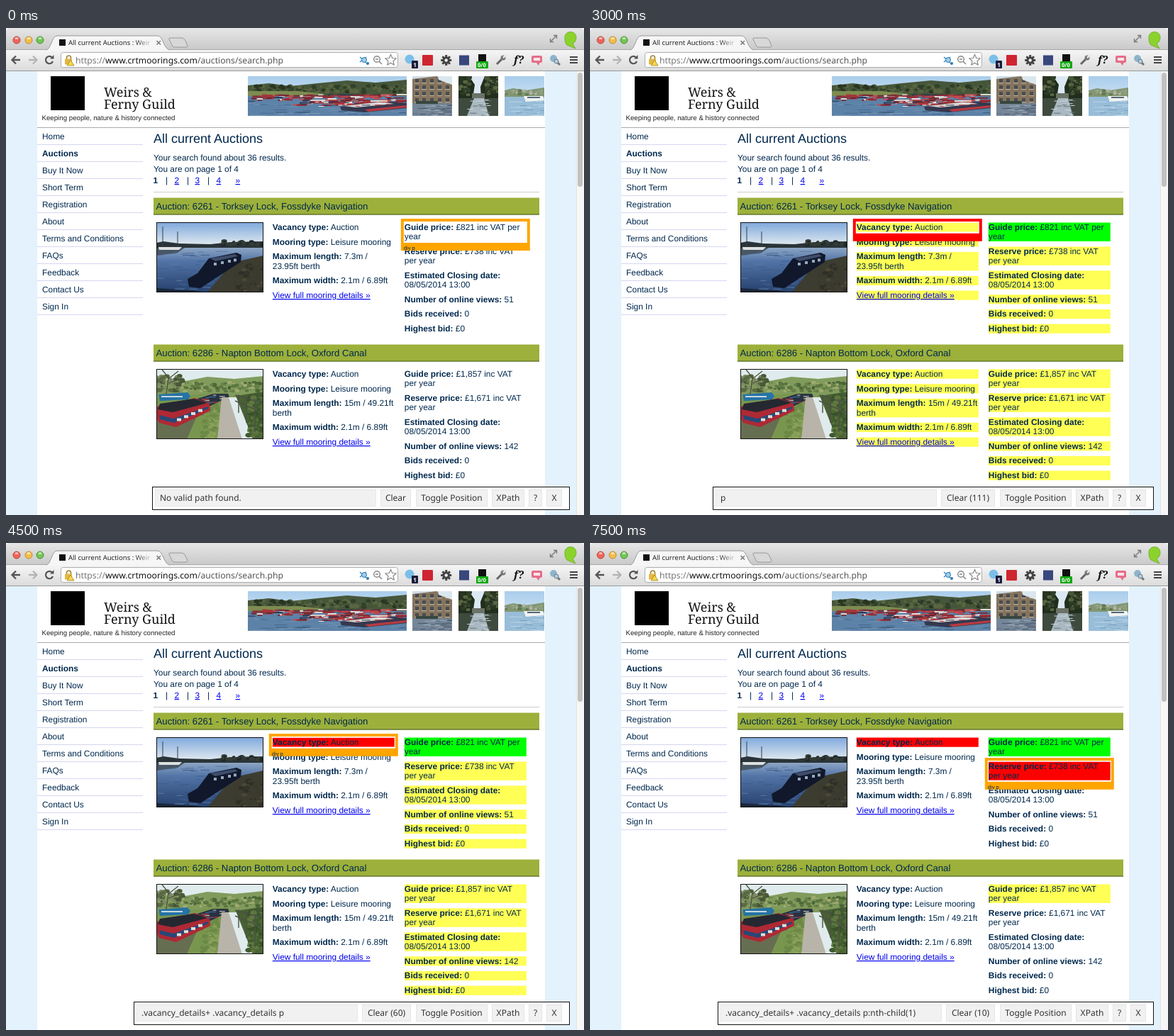
Animation of 815x687 px, one loop 9000 ms. Source, as an HTML page:

```html
<!DOCTYPE html>
<html lang="en">
<head>
<meta charset="utf-8">
<title>Auction selector</title>
<style>
  html, body { margin: 0; width: 100%; height: 100%; overflow: hidden; background: #fff; }
  #stage { display: block; }
  text { font-family: "Liberation Sans", Arial, sans-serif; fill: #00284d; text-rendering: geometricPrecision; white-space: pre; }
  .ui { font-family: "Noto Sans", "Open Sans", sans-serif; fill: #333; }
  .serif { font-family: "Noto Serif", serif; fill: #111; }
  .link { fill: #0000ee; text-decoration: underline; }
  .bold { font-weight: bold; }
</style>
</head>
<body>
<svg id="stage" width="815" height="687" viewBox="0 0 815 687" xmlns="http://www.w3.org/2000/svg"></svg>
<script>
const LOOP = 9000, STEP = 1500;
const YELLOW = '#ffff55', GREEN = '#00ff00', RED = '#ff0000', ORANGE = '#ffa500';

const rect = (x, y, w, h, fill, more = '') =>
  `<rect x="${x}" y="${y}" width="${w}" height="${h}" fill="${fill}" ${more}/>`;
const text = (x, y, content, size = 11.9, more = '') =>
  `<text x="${x}" y="${y}" font-size="${size}" ${more}>${content}</text>`;
const path = (d, fill, more = '') => `<path d="${d}" fill="${fill}" ${more}/>`;
const line = (d, colour, width = 1, more = '') =>
  path(d, 'none', `stroke="${colour}" stroke-width="${width}" ${more}`);
const circle = (x, y, r, fill, more = '') => `<circle cx="${x}" cy="${y}" r="${r}" fill="${fill}" ${more}/>`;
const fade = (id, stops, axis = 'x2="0" y2="1"') =>
  `<linearGradient id="${id}" ${axis}>${stops.map(([at, c, o = 1]) =>
    `<stop offset="${at}" stop-color="${c}" stop-opacity="${o}"/>`).join('')}</linearGradient>`;
const picture = (x, y, w, h, content) => `<svg x="${x}" y="${y}" width="${w}" height="${h}">${content}</svg>`;

function randomFrom(seed) {
  return () => (seed = (seed * 16807) % 2147483647) / 2147483647;
}

// Small shapes of random size and colour scattered over a box.
function scatter(seed, count, [x, y, w, h], colours, shape) {
  const rnd = randomFrom(seed * 7919);
  return Array.from({ length: count }, () =>
    shape((x + rnd() * w).toFixed(1), (y + rnd() * h).toFixed(1), 0.5 + rnd(),
      colours[Math.floor(rnd() * colours.length)])).join('');
}
const clumps = (seed, count, box, size, colours) => scatter(seed, count, box, colours, (x, y, k, fill) =>
  `<ellipse cx="${x}" cy="${y}" rx="${(size * k * 1.4).toFixed(1)}" ry="${(size * k).toFixed(1)}" fill="${fill}"/>`);
const streaks = (seed, count, box, length, colours, thick = 1) => scatter(seed, count, box, colours, (x, y, k, fill) =>
  rect(x, y, (length * k).toFixed(1), thick, fill));

const defs = `<defs>
  ${fade('strip', [[0, '#e6e6e6'], [1, '#c9c9c9']])}
  ${fade('bar', [[0, '#f6f6f6'], [1, '#dcdcdc']])}
  ${fade('title', [[0, '#222'], [.77, '#222'], [1, '#222', 0]], 'gradientUnits="userSpaceOnUse" x1="88" x2="209"')}
  ${fade('sky', [[0, '#7fa8dc'], [1, '#e3ebf0']])}
  ${fade('water', [[0, '#9db3cd'], [.35, '#5274a6'], [1, '#26406c']])}
  ${fade('pale', [[0, '#a9cdec'], [1, '#e6f0f6']])}
</defs>`;

function browser() {
  const light = (x, fill, edge) => circle(x, 17, 5, fill, `stroke="${edge}"`) +
    `<ellipse cx="${x}" cy="14.5" rx="2.6" ry="1.5" fill="#fff" opacity=".6"/>`;
  const gear = Array.from({ length: 8 }, (_, i) =>
    rect(619.2, 38, 3, 4, '#444', `transform="rotate(${i * 45} 620.7 45.5)"`)).join('');
  return path('M0 31V5Q0 0 5 0H810Q815 0 815 5V31Z', 'url(#strip)') +
    rect(0, 30, 815, 30, 'url(#bar)') + rect(0, 60, 815, 1, '#9a9a9a') +
    line('M0 30.5H57M232 30.5H815', '#a8a8a8') +
    light(15, '#f0655a', '#b8443c') + light(32, '#f5bd4c', '#bd8a2e') + light(48, '#72c655', '#4b9134') +
    path('M56 31C64 31 64 11 72 11H214C222 11 222 31 232 31', '#f6f6f6', 'stroke="#999"') +
    path('M232 14H248Q251 14 253 18L256 25Q256 27 253 27H238Q235 27 234 24L230 16Q229 14 232 14Z', '#d8d8d8', 'stroke="#999"') +
    rect(75, 16, 9, 9, '#111') +
    text(88, 24, 'All current Auctions : Weir', 9.5, 'class="ui" style="fill:url(#title)"') +
    line('M212.5 18L218 23.5M218 18L212.5 23.5', '#777', 1.5) +
    line('M767 20L777 10M772 10.5H776.5V15M767.5 15V19.5H772', '#777', 1.3) +
    path('M788 13C788 3 804 3 804 13C804 19 801 21 799 22L803 29L791 24C788 21 788 17 788 13Z', '#8bd32c', 'stroke="#62a51c" stroke-width=".7"') +
    line('M20 45H9M14 39.5L8.5 45L14 50.5', '#555', 2.3) +
    line('M32 45H43M38 39.5L43.5 45L38 50.5', '#b5b5b5', 2.3) +
    line('M65 41.5A5.2 5.2 0 1 0 66 47', '#555', 2.2) + path('M62 43.5H67.5V38Z', '#555') +
    rect(77.5, 34.5, 475, 21, '#fff', 'rx="3" stroke="#adadad"') +
    line('M85.5 44V42A3 3 0 0 1 91.5 42V44', '#a28633', 1.7) + rect(83, 43.5, 10, 8, '#e5b844', 'rx="1"') +
    path('M91 45L96 53H86Z', '#f7d845', 'stroke="#8d772b" stroke-width=".7"') +
    text(98, 50, '<tspan fill="#777">https://</tspan><tspan fill="#111">www.crtmoorings.com</tspan><tspan fill="#555">/auctions/search.php</tspan>', 12.2, 'class="ui"') +
    line('M499 41L508 49M499 48L508 41', '#3183bd', 1.4) + circle(505, 45, 3.5, '#9fd0ed', 'stroke="#2c78ad"') + circle(510, 50, 2, '#2c78ad') +
    circle(523, 44, 4.3, '#fff', 'stroke="#8a8a8a" stroke-width="1.5"') + line('M521 44H525M526 47L530 51', '#8a8a8a', 1.6) +
    path('M542.5 37.5L544.8 42.5L550 43L546 46.7L547.2 52L542.5 49.2L537.8 52L539 46.7L535 43L540.2 42.5Z', '#fff', 'stroke="#888" stroke-width="1.2"') +
    circle(569, 44, 6.5, '#7bbfe8') + rect(572, 46, 9, 11, '#1c1c3c', 'rx="1"') + text(574.2, 55, '1', 8, 'class="ui" style="fill:#fff;font-weight:bold"') +
    rect(587, 38, 15, 15, '#cf2530', 'rx="1"') +
    gear + circle(620.7, 45.5, 5.3, '#444') + circle(620.7, 45.5, 2.2, '#eee') +
    rect(639, 38.5, 14, 14, '#38477c') +
    rect(666, 37, 11, 11, '#111') + rect(663, 47, 17, 10, '#10a810', 'rx="1"') + text(665, 55, '0/0', 7.6, 'class="ui" style="fill:#fff;font-weight:bold"') +
    line('M692 51L700 43', '#666', 3) + circle(701, 42, 3.5, '#777') + line('M701 42L706 37', '#e8e8e8', 2.5) +
    text(716, 50, 'f?', 15, 'class="serif" font-style="italic" font-weight="bold"') +
    rect(741, 39, 15, 10, '#e56e89', 'rx="2"') + path('M747 48H753L751 53Z', '#e56e89') + rect(744, 42, 9, 4, '#fae4e8') +
    circle(772, 43, 5, '#8eb4cc') + line('M775 46L781 52', '#777', 3) + circle(776, 47, 3, '#b4cedd', 'stroke="#678"') +
    [40, 44, 48].map(y => rect(795, y, 11, 2, '#444')).join('');
}

const greens = ['#30402a', '#465737', '#293521', '#596641'];
const hulls = ['#a63238', '#c2474a', '#e1dedb', '#6f2830', '#2b3450', '#8c2c35'];
const banner = rect(0, 0, 224, 56, 'url(#pale)') +
  path('M0 13L30 10L60 14L98 10L140 6L180 9L224 5V30H0Z', '#46563a') +
  clumps(7, 120, [0, 13, 224, 10], 2, greens) + path('M0 21H70L110 25L70 28H0Z', '#7d8c51') +
  rect(0, 28, 224, 28, '#5d82a8') + streaks(17, 70, [-10, 30, 234, 25], 16, ['#456890', '#7898b6', '#6d8fb0', '#3d5a78']) +
  streaks(4, 90, [5, 25, 205, 8], 12, hulls, 2) + streaks(21, 60, [60, 32, 150, 8], 16, hulls, 2) +
  path('M130 43L205 36L224 38V45L164 51L132 48Z', '#34394f') + path('M136 42L188 36L206 39L152 44Z', '#d6d4d3') +
  path('M165 47L224 41V44L170 50Z', '#b83a40') + streaks(12, 25, [75, 34, 140, 8], 8, ['#ece9e3', '#bc3b3e', '#24344e']);

const flats = rect(0, 0, 56, 56, '#cddde8') + path('M0 4L34 0L56 9V40H0Z', '#85745e') +
  [4, 13, 22, 31].map(y => [4, 14, 25, 36, 47].map(x => rect(x, y, 5, 5, '#494d50') + rect(x - 1, y + 5, 7, 1, '#c2b7a4')).join('')).join('') +
  path('M36 0H56V12L37 5Z', '#dbe7ef') + rect(0, 38, 56, 18, '#758698') +
  streaks(8, 30, [0, 38, 56, 18], 10, ['#485769', '#9eacb8', '#5d6e80']) + rect(5, 35, 31, 4, '#37473f');

const avenue = rect(0, 0, 56, 56, '#dce8f2') + path('M0 0H15L23 12L20 32H0ZM56 0H37L31 15L32 32H56Z', '#212d1d') +
  clumps(23, 40, [0, 0, 16, 27], 2, greens) + clumps(29, 40, [40, 0, 16, 27], 2, greens) +
  rect(19, 24, 18, 8, '#6b7267') + path('M0 31H56V56H0Z', '#3d4a3d') + path('M22 31H36L43 56H12Z', '#a9b8c2') +
  streaks(16, 16, [12, 33, 28, 22], 8, ['#65756f', '#cad4da']);

const marina = rect(0, 0, 56, 56, 'url(#pale)') + path('M0 20L12 17L30 20L56 16V29H0Z', '#819572') +
  clumps(31, 30, [0, 20, 56, 6], 1.5, ['#617a51', '#90a182', '#b5b4a6']) + rect(0, 29, 56, 27, '#98bdd8') +
  streaks(9, 20, [0, 32, 56, 23], 14, ['#b8d3e6', '#769eba']) + path('M27 28H54L56 34L30 36Z', '#f1f3f2') + rect(32, 29, 18, 2, '#546877');

const dusk = rect(0, 0, 151, 33, 'url(#sky)') + rect(0, 31, 151, 68, 'url(#water)') +
  path('M0 29L10 27L32 30L76 31L105 28L151 27V36H0Z', '#2a3438') + clumps(5, 30, [90, 27, 60, 5], 2, ['#1e2928', '#343c35']) +
  streaks(18, 60, [-5, 40, 110, 55], 12, ['#3f5f92', '#5878a4', '#34518390']) +
  path('M0 36H40L30 43L0 47Z', '#485766') + path('M3 35H36L32 39H4Z', '#dce0df') +
  line('M9 6V34M30 13V34', '#303c45') + path('M107 57L151 47V99H72Z', '#3d3c30') +
  clumps(33, 60, [112, 60, 38, 38], 2, ['#302f27', '#4b4736', '#3b3a2f']) +
  path('M44 80L58 72L74 51L113 43L120 46L119 56L62 93L46 91Z', '#11182b') +
  path('M76 51L111 45L115 48L83 55Z', '#3e4d6b') + [81, 91, 101, 109].map(x => rect(x, 57 - (x - 81) * .2, 4, 4, '#96a8be')).join('') +
  path('M0 93L50 96L72 99H0Z', '#1b263a');

const towpath = rect(0, 0, 151, 99, '#e0ebed') + path('M0 15L40 17L72 11L110 14L151 10V40H0Z', '#819b5c') +
  clumps(6, 90, [30, 18, 121, 14], 2, ['#4b6636', '#67804a', '#9fac6f', '#5d7743']) +
  clumps(14, 60, [-2, 8, 40, 26], 2, ['#596a42', '#7c8964', '#475737']) +
  line('M14 36L17 12L8 1M17 14L31 3M17 20L36 13', '#4a5138', 1.2) +
  path('M0 40L100 33L94 99H0Z', '#79964f') + clumps(10, 120, [64, 48, 26, 50], 2, ['#6b8846', '#8aa15a', '#78934d']) +
  path('M0 55L65 49L43 99H0Z', '#666e51') + path('M3 36L44 33L48 38L45 43L5 45Z', '#2673a5') + rect(7, 38, 30, 2, '#c8d8de') +
  path('M39 48L80 35L101 35L103 39L68 56Z', '#293241') + streaks(3, 12, [62, 36, 30, 12], 8, ['#3974a3', '#d5d9d7', '#b83d43']) +
  path('M0 53L54 41L75 49L76 59L28 82L4 76L1 70Z', '#ae2934') + path('M5 49L53 42L72 48L23 61L2 57Z', '#252831') +
  path('M4 65L24 70L73 53V56L25 76L5 71Z', '#284878') + [29, 39, 49, 59].map(x => rect(x, 82 - x * .43, 6, 4, '#dfdfd7')).join('') +
  path('M92 40H102L121 99H86Z', '#b8b4a9') + path('M112 38L151 32V99H136Z', '#486034') +
  clumps(44, 90, [130, 36, 24, 60], 2.5, ['#375029', '#4d6735', '#5f773f', '#3f5930']) +
  line('M111 37L151 48M111 45L151 62M116 36V62M127 39V76M139 42V89', '#4b5143', 1.4);

const label = s => `<tspan class="bold">${s}</tspan>`;
const leftRows = length => [
  [label('Vacancy type:') + ' Auction'],
  [label('Mooring type:') + ' Leisure mooring'],
  [label('Maximum length:') + ' ' + length[0], length[1]],
  [label('Maximum width:') + ' 2.1m / 6.89ft'],
  ['<tspan class="link">View full mooring details »</tspan>']
];
const rightRows = (guide, reserve, views) => [
  [label('Guide price:') + ' ' + guide[0], guide[1]],
  [label('Reserve price:') + ` £${reserve} inc VAT`, 'per year'],
  [label('Estimated Closing date:'), '08/05/2014 13:00'],
  [label('Number of online views:') + ' ' + views],
  [label('Bids received:') + ' 0'],
  [label('Highest bid:') + ' £0']
];
const auctions = [
  { title: 'Auction: 6261 - Torksey Lock, Fossdyke Navigation', photo: dusk,
    L: leftRows(['7.3m /', '23.95ft berth']), R: rightRows(['£821 inc VAT per', 'year'], '738', 51) },
  { title: 'Auction: 6286 - Napton Bottom Lock, Oxford Canal', photo: towpath,
    L: leftRows(['15m / 49.21ft', 'berth']), R: rightRows(['£1,857 inc VAT', 'per year'], '1,671', 142) }
];

// Row ids read: auction index, column, row index.
const LINE = 13.2, GAP = 7.5, ROW_WIDTH = 172;
const rows = {};
auctions.forEach((auction, a) => [['L', 375.8], ['R', 561.8]].forEach(([column, x]) => {
  let y = 274.5 + a * 207;
  auction[column].forEach((lines, i) => {
    const h = lines.length * LINE;
    rows[a + column + i] = { x, y, h, lines };
    y += h + GAP;
  });
}));

function page() {
  const nav = ['Home', 'Auctions', 'Buy It Now', 'Short Term', 'Registration', 'About',
    'Terms and Conditions', 'FAQs', 'Feedback', 'Contact Us', 'Sign In'];
  const pages = [[238, '2'], [267, '3'], [297, '4'], [324, '»']];
  return rect(0, 61, 804, 626, '#e3f2fc') + rect(44, 61, 716, 626, '#fff') +
    rect(804, 61, 11, 626, '#f7f7f7') + rect(804, 61, 1, 626, '#e3e3e3') + rect(806, 63, 7, 161, '#c1c1c1', 'rx="3.5"') +
    rect(63, 68, 48, 48, '#000') +
    text(138, 97, 'Weirs &amp;', 18, 'class="serif"') + text(138, 114, 'Ferny Guild', 18, 'class="serif"') +
    text(50.5, 130, 'Keeping people, nature &amp; history connected', 9.7, 'style="fill:#222"') +
    picture(341, 68, 224, 56, banner) + picture(573, 68, 56, 56, flats) +
    picture(638, 68, 56, 56, avenue) + picture(703, 68, 56, 56, marina) +
    rect(44, 140, 716, 1, '#aaa') +
    nav.map((s, i) => text(51, 157 + i * 24, s, 11.9, i === 1 ? 'class="bold"' : '') + rect(44, 164 + i * 24, 149, 1, '#d6d6f2')).join('') +
    text(208, 162, 'All current Auctions', 18) +
    text(208, 187, 'Your search found about 36 results.') + text(208, 203, 'You are on page 1 of 4') +
    text(207.5, 219, '1', 11.9, 'class="bold"') + [225, 255, 284].map(x => text(x, 219, '|')).join('') +
    pages.map(([x, s]) => text(x - .5, 219, s, 11.9, 'class="link"')).join('') +
    rect(208, 231, 544, 1, '#ccc') +
    auctions.map(({ title, photo }, a) => {
      const y = 239 + a * 207;
      return rect(208, y + .5, 544, 24, '#9cb03b') + rect(208, y + 23.5, 544, 1, '#4d5d2a') +
        text(211.5, y + 17, title, 13.2) + picture(212, y + 35, 151, 99, photo) +
        rect(212.5, y + 35.5, 150, 98, 'none', 'stroke="#111"');
    }).join('');
}

const rowText = Object.values(rows).map(({ x, y, lines }) =>
  lines.map((s, i) => text(x, y + 10.5 + i * LINE, s)).join('')).join('');

const broad = '.vacancy_details+ .vacancy_details p';
const steps = [
  { left: 206, path: 'No valid path found.', count: '', box: '0R0', tint: ORANGE, yellow: /^$/, red: [] },
  { left: 173, path: 'p', count: ' (111)', box: '0R0', tint: RED, yellow: /./, red: [], green: '0R0' },
  { left: 173, path: 'p', count: ' (111)', box: '0L0', tint: RED, yellow: /./, red: [], green: '0R0' },
  { left: 180, path: broad, count: ' (60)', box: '0L0', tint: ORANGE, yellow: /R/, red: ['0L0'], green: '0R0' },
  { left: 180, path: broad, count: ' (60)', box: '0R1', tint: RED, yellow: /R/, red: ['0L0'], green: '0R0' },
  { left: 180, path: broad + ':nth-child(1)', count: ' (10)', box: '0R1', tint: ORANGE, yellow: /^1R0/, red: ['0L0', '0R1'], green: '0R0' }
];

const marks = step => Object.entries(rows).map(([id, { x, y, h }]) => {
  const fill = step.red.includes(id) ? RED : id === step.green ? GREEN : step.yellow.test(id) ? YELLOW : '';
  return fill && rect(x, y, ROW_WIDTH, h, fill);
}).join('');

// A white hairline separates the selected row from its frame.
function outline({ box, tint }) {
  const { x, y, h } = rows[box], bottom = y + h + 2;
  return rect(x - .5, y - .5, ROW_WIDTH + 1, h + 1, 'none', 'stroke="#fff"') +
    path(`M${x - 5} ${y - 5.5}h182V${bottom + 11}h-182ZM${x - 1} ${y - 1.5}V${bottom}h174V${y - 1.5}Z`, tint, 'fill-rule="evenodd"') +
    (tint === ORANGE ? text(x - 1, bottom + 10, 'div p', 7.6) : '');
}

function panel({ left, path: selector, count }) {
  const button = (from, to, s) => rect(from + .5, 651.5, to - from - 1, 23, '#f1f1f1', 'stroke="#e5e5e5"') +
    text((from + to) / 2, 667, s, 12, 'class="ui" text-anchor="middle"');
  return rect(left + .5, 647.5, 794 - left - 6 + 6, 32, '#fff', 'stroke="#111"').replace('  ', ' ') +
    rect(left + 4.5, 651.5, 311, 23, '#f1f1f1', 'stroke="#e8e8e8"') +
    text(left + 11, 667, selector, 12, 'class="ui"') +
    button(left + 322, 571, 'Clear' + count) + button(578, 679, 'Toggle Position') +
    button(685, 731, 'XPath') + button(737, 756, '?') + button(762, 784, 'X');
}

const stage = document.getElementById('stage');
stage.innerHTML = defs + browser() + page() + `<g id="marks"></g>${rowText}<g id="outline"></g><g id="panel"></g>`;
const layers = { marks, outline, panel };
let shown = -1;

function draw() {
  const index = Math.floor((performance.now() % LOOP) / STEP);
  if (index !== shown) {
    shown = index;
    for (const id in layers) document.getElementById(id).innerHTML = layers[id](steps[index]);
  }
  requestAnimationFrame(draw);
}
draw();
</script>
</body>
</html>
```
